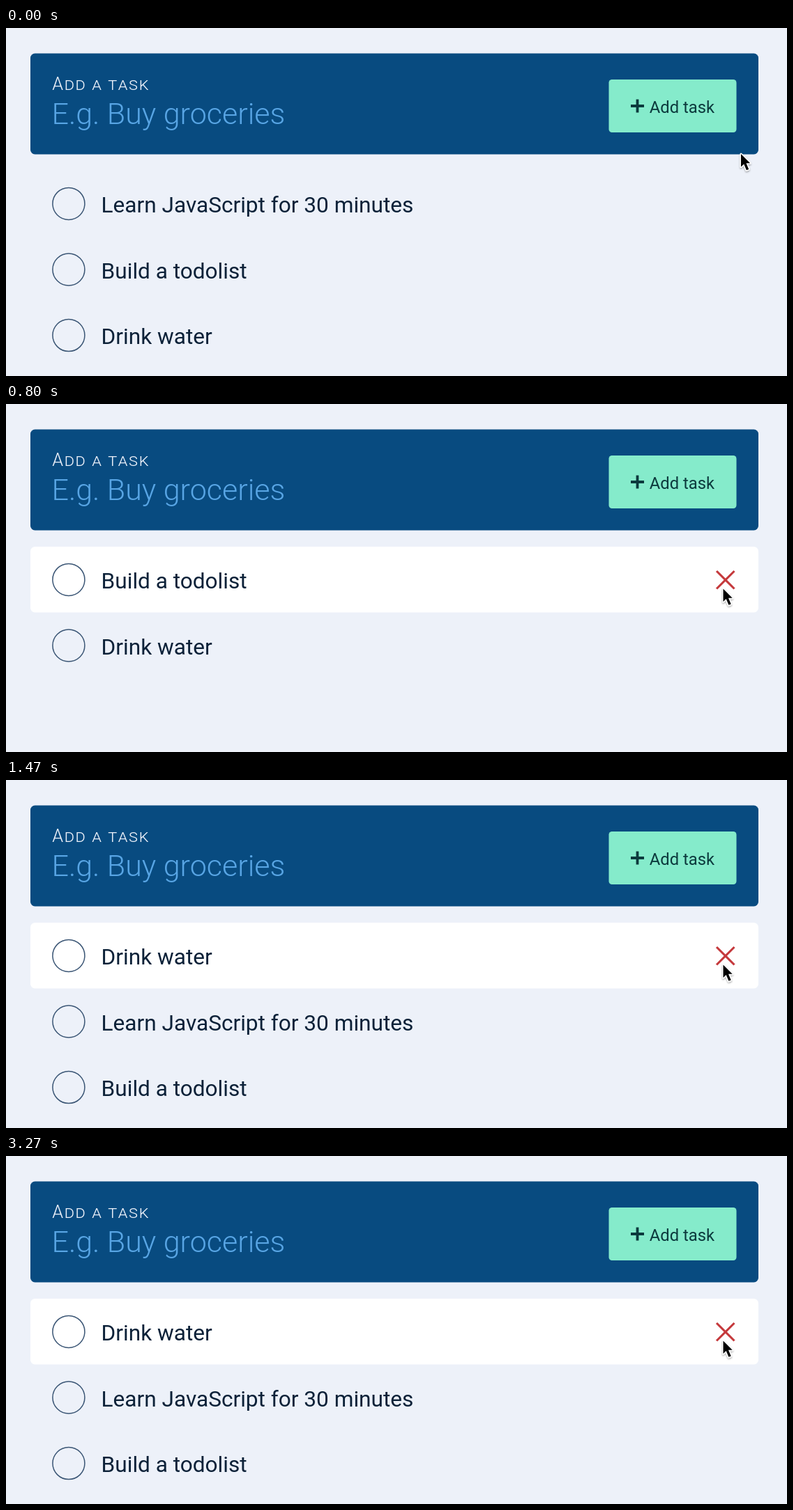
Write an HTML page that moves like this. It is 1120x500 px and loops after 3.34 s.

```html
<!DOCTYPE html>
<html lang="en">
<head>
<meta charset="utf-8">
<title>Todo list</title>
<style>
  html, body { margin: 0; width: 100%; height: 100%; overflow: hidden; background: #edf1f9; }
  svg { display: block; width: 1120px; height: 500px; font-family: Roboto, sans-serif; }
  .label { font-size: 25.3px; font-weight: 300; font-variant: small-caps; letter-spacing: 1.6px; fill: #edf1f9; }
  .hint { font-size: 43px; font-weight: 300; fill: #58a5e4; }
  .add { font-size: 23.8px; fill: #0c3a3d; }
  .task { font-size: 31.6px; fill: #0c2138; }
</style>
</head>
<body>
<svg viewBox="0 0 1120 500">
  <defs>
    <filter id="shade" x="-50%" y="-50%" width="200%" height="200%">
      <feDropShadow dx="0" dy="1.5" stdDeviation="1.3" flood-opacity=".35"/>
    </filter>
  </defs>
  <rect width="1120" height="500" fill="#edf1f9"/>
  <rect x="35" y="36.5" width="1044" height="145" rx="6.5" fill="#084b80"/>
  <text class="label" x="66.3" y="89">Add a task</text>
  <text class="hint" x="65.5" y="138">E.g. Buy groceries</text>
  <rect x="864.5" y="74" width="183" height="76" rx="4.5" fill="#85ebcb"/>
  <path d="M896 112h19M905.5 102.5v19" stroke="#0c3a3d" stroke-width="3.8"/>
  <text class="add" x="922.7" y="121.5">Add task</text>
  <g id="hover">
    <rect x="35" y="205" width="1044" height="94.5" rx="6.5" fill="#fff"/>
    <path id="cross" d="M1019 240l25.5 25.5m0-25.5l-25.5 25.5" fill="none" stroke-width="3.1"/>
  </g>
  <g id="rows"></g>
  <circle id="ring" cx="1027.6" cy="265.6" r="34" fill="none" stroke="#000" stroke-width="2.3"/>
  <g id="cursor">
    <path d="M0 0V18.5L4.2 14.6L7.9 23.3L11.2 21.9L7.5 13.3H13.2Z" fill="#000" stroke="#fff"
      stroke-width="3" stroke-linejoin="round" paint-order="stroke" filter="url(#shade)"/>
  </g>
</svg>
<script>
const LOOP = 3340, TRAVEL = 450;
const LEARN = 'Learn JavaScript for 30 minutes', BUILD = 'Build a todolist', DRINK = 'Drink water';

// Deleted tasks come back at the end of the list.
const states = [
  [0, [LEARN, BUILD, DRINK]],
  [790, [BUILD, DRINK]],
  [990, [DRINK]],
  [1260, [DRINK, LEARN]],
  [1460, [DRINK, LEARN, BUILD]]
];
const presses = [[660, 790], [860, 990]];

const $ = id => document.getElementById(id);
const make = (tag, attrs, parent) => {
  const el = document.createElementNS('http://www.w3.org/2000/svg', tag);
  for (const key in attrs) el.setAttribute(key, attrs[key]);
  return parent.appendChild(el);
};
const show = (el, on) => el.setAttribute('visibility', on ? 'visible' : 'hidden');

const rows = [0, 1, 2].map(i => {
  const g = make('g', { transform: `translate(0 ${i * 94.6})` }, $('rows'));
  make('circle', { cx: 89.9, cy: 252.4, r: 23, fill: 'none', stroke: '#3b5675', 'stroke-width': 1.5 }, g);
  return { g, text: make('text', { class: 'task', x: 136.6, y: 265.2 }, g) };
});

function render(ms) {
  // 15 pictures per second, as in a screen recording
  const t = Math.min(49, Math.floor((ms + 4) * 0.015)) / 0.015;
  const p = Math.min(1, t / TRAVEL);
  const x = 1054 - 25.5 * (1 - (1 - p) ** 1.5);
  const y = 181 + 84.5 * p * p * (3 - 2 * p);
  $('cursor').setAttribute('transform', `translate(${x} ${y})`);
  show($('hover'), y >= 205);
  $('cross').setAttribute('stroke', y > 236 ? '#c5393c' : '#4f6f90');
  show($('ring'), presses.some(([down, up]) => t >= down && t < up));

  const tasks = states.filter(s => t >= s[0]).pop()[1];
  rows.forEach(({ g, text }, i) => {
    show(g, i < tasks.length);
    text.textContent = tasks[i] || '';
  });
}

let start;
function tick(now) {
  start ??= now;
  render((now - start) % LOOP);
  requestAnimationFrame(tick);
}
render(0);
requestAnimationFrame(tick);
</script>
</body>
</html>
```
